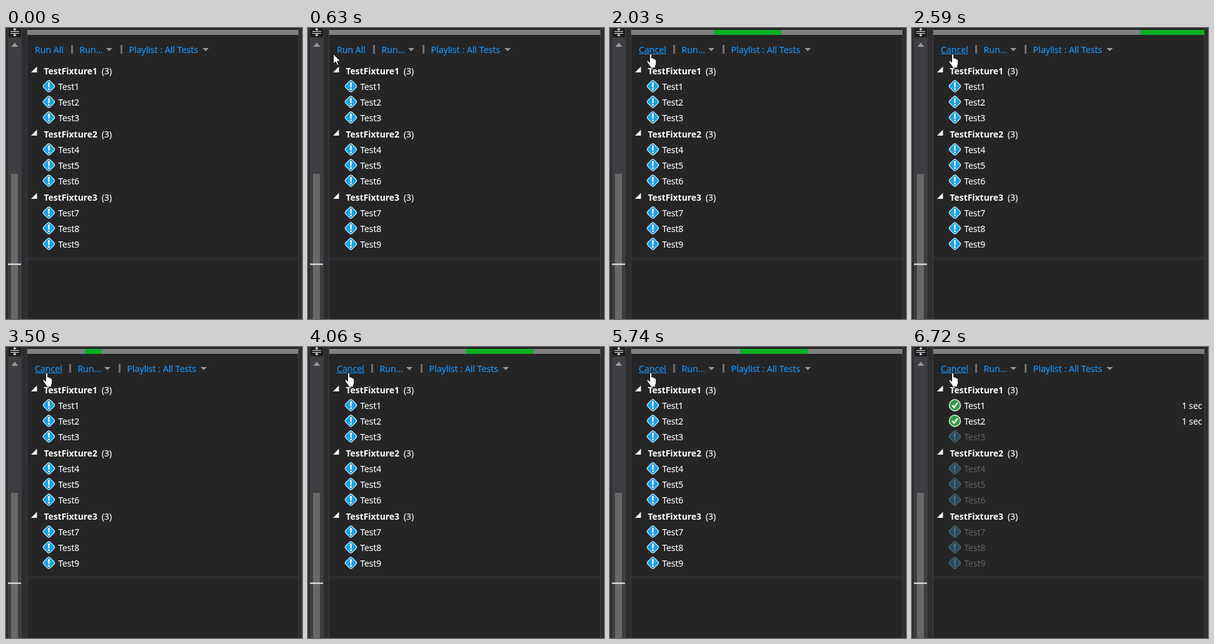
Recreate the animation shown at these times as an HTML page. Size 473 by 465 pixels, loop 8 s.

```html
<!DOCTYPE html>
<html lang="en">
<head>
<meta charset="utf-8">
<title>Test explorer</title>
<style>
  html, body { margin: 0; width: 100%; height: 100%; overflow: hidden; background: #252526; }
  svg { display: block; }
  text { font: 13.8px "Open Sans", "Noto Sans", sans-serif; fill: #fff; stroke: #fff; stroke-width: .2; }
  .link { font-size: 14.2px; fill: #1a97ff; stroke: #1a97ff; }
  .fixture { font-size: 13.9px; font-weight: 700; stroke: none; }
  .dim text { fill: #656565; stroke: none; }
  .dim .icon { opacity: .32; }
</style>
</head>
<body>
<svg width="473" height="465" viewBox="0 0 473 465">
  <defs>
    <g id="pending">
      <rect x="-7.3" y="-7.3" width="14.6" height="14.6" rx="3.2" transform="rotate(45)" fill="#1ba1e2" stroke="#d3ebf7" stroke-width="1.1"/>
      <path d="M-1.3 -6H1.3L1 2H-1ZM-1.3 3.6H1.3V6H-1.3Z" fill="#fff"/>
    </g>
    <g id="passed">
      <circle r="9" fill="#339a43" stroke="#f0f5f0" stroke-width="1.4"/>
      <path d="M-4.3 -.2L-1.3 3.6L4.3 -4" fill="none" stroke="#fff" stroke-width="2.2"/>
    </g>
  </defs>

  <!-- Left gutter and scrollbar -->
  <path d="M0 0H33V465H0Z" fill="#2d2d30"/>
  <path d="M3 0H25V465H3Z" fill="#3e3e42"/>
  <path d="M8 233H19V465H8Z" fill="#686868"/>
  <path d="M4 0H24V15H4Z" fill="#1e1e1e"/>
  <path d="M7 5.5H21M7 8.5H21M14 1V5M14 9V13" stroke="#e8e8e8"/>
  <path d="M11 3L14 0L17 3ZM11 10.5H17L14 13.5Z" fill="#e8e8e8"/>
  <path d="M8.5 30L14 23.5L19.5 30Z" fill="#999"/>
  <path d="M3 376.5H24V378.5H3Z" fill="#f0f0f0"/>

  <!-- Panel frame -->
  <path d="M33 0H34V465H33ZM467 0H468V465H467Z" fill="#3f3f46"/>
  <path d="M468 0H473V465H468Z" fill="#2d2d30"/>
  <path d="M34 366H467V371H34Z" fill="#2d2d30"/>
  <path d="M34 3H467V11H34Z" fill="#808080"/>
  <rect id="block" y="3" height="8" fill="#06b025"/>

  <!-- Toolbar -->
  <text id="action" class="link" x="46" y="39.5"></text>
  <path id="underline" fill="#1a97ff"/>
  <g id="tools">
    <path d="M104 27H107V41H104ZM183 27H186V41H183Z" fill="#717174"/>
    <path d="M160 32H170L165 37ZM314 32H324L319 37Z" fill="#999"/>
    <text class="link" x="117.5" y="39.5">Run...</text>
    <text class="link" x="196.5" y="39.5">Playlist : All Tests</text>
  </g>

  <g id="tree"></g>

  <path id="arrow" d="M.5 .5V16.5L4.2 13L6.8 18.8L9.2 17.8L6.7 12H12Z" fill="#fff" stroke="#000"/>
  <path id="hand" transform="translate(58.5 40.5)" fill="#fff" stroke="#111" stroke-width="1"
    d="M5 2.6Q5 .7 6.6 .7Q8.2 .7 8.2 2.6V7.6Q10.6 7 11 8.6Q13 8.2 13.4 9.6Q15.3 9.4 15.3 11.6V16Q15.3 18.4 13.8 20.4V23.4H6V21L2 16L.6 13.2Q.6 11.4 2.2 11.8L5 14.4Z"/>
</svg>
<script>
const LOOP = 8000, STEP = 70;
const BLOCK_W = 108, BAR_RIGHT = 467;
// Each sweep: start time and left edge of the block on its step 11
const SWEEPS = [[1680, 317], [3500, 327], [5320, 333]];
const el = id => document.getElementById(id);
const show = (node, on) => node.style.display = on ? "" : "none";

function buildTree() {
  let html = "";
  for (let f = 0; f < 3; f++) {
    const y = 69 + f * 101;
    html += `<path d="M40 ${y + 2}L49.5 ${y - 7.5}V${y + 2}Z" fill="#f4f4f4"/>
      <text class="fixture" x="60.5" y="${y + 5}">TestFixture${f + 1}</text>
      <text x="153" y="${y + 5}">(3)</text>`;
    for (let i = 0; i < 3; i++) {
      const row = y + 25 + i * 25;
      html += `<g class="test"><use class="icon" href="#pending" x="68.5" y="${row - 1}"/>
        <text x="83.4" y="${row + 4.5}">Test${f * 3 + i + 1}</text>
        <text class="time" x="463.5" y="${row + 4.5}" text-anchor="end">1 sec</text></g>`;
    }
  }
  el("tree").innerHTML = html;
}

function drawTests(done) {
  document.querySelectorAll(".test").forEach((row, i) => {
    const passed = done && i < 2;
    row.classList.toggle("dim", done && !passed);
    row.querySelector(".icon").setAttribute("href", passed ? "#passed" : "#pending");
    show(row.querySelector(".time"), passed);
  });
}

function drawToolbar(t) {
  const running = t >= 1260;
  el("action").textContent = running ? "Cancel" : "Run All";
  el("underline").setAttribute("d", `M46 41H${running ? 90 : 93}V42H46Z`);
  show(el("underline"), t >= 1120);
  el("tools").setAttribute("transform", `translate(${running ? -3 : 0})`);
}

function arrowAt(t) {
  if (t >= 910) return [61, 41];
  if (t >= 700) return [54, 49];
  const p = Math.floor((t - 140) / STEP) / 7, q = 1 - p;
  const curve = (a, b, c) => q * q * a + 2 * q * p * b + p * p * c;
  return [curve(239, 130, 40), curve(358, 270, 41)];
}

function drawCursor(t) {
  show(el("arrow"), t >= 140 && t < 1120);
  show(el("hand"), t >= 1120);
  el("arrow").setAttribute("transform", `translate(${arrowAt(t)})`);
}

function drawBlock(t) {
  const sweep = SWEEPS.find(([start]) => t >= start && t < start + 17 * STEP);
  show(el("block"), sweep);
  if (!sweep) return;
  const [start, anchor] = sweep;
  const leftAt = n => Math.floor(anchor + 24.5 * (n - 11) - .1 * (n - 11) ** 2);
  const n = Math.floor((t - start) / STEP);
  // The block emerges from behind a fixed edge
  const left = Math.max(leftAt(n), leftAt(-1) + BLOCK_W);
  const right = Math.min(leftAt(n) + BLOCK_W, BAR_RIGHT);
  el("block").setAttribute("x", left);
  el("block").setAttribute("width", Math.max(0, right - left));
}

function render(t) {
  drawToolbar(t);
  drawCursor(t);
  drawBlock(t);
  drawTests(t >= 6720);
}

buildTree();
render(0);
const begin = performance.now();
(function tick() {
  render((performance.now() - begin) % LOOP);
  requestAnimationFrame(tick);
})();
</script>
</body>
</html>
```
